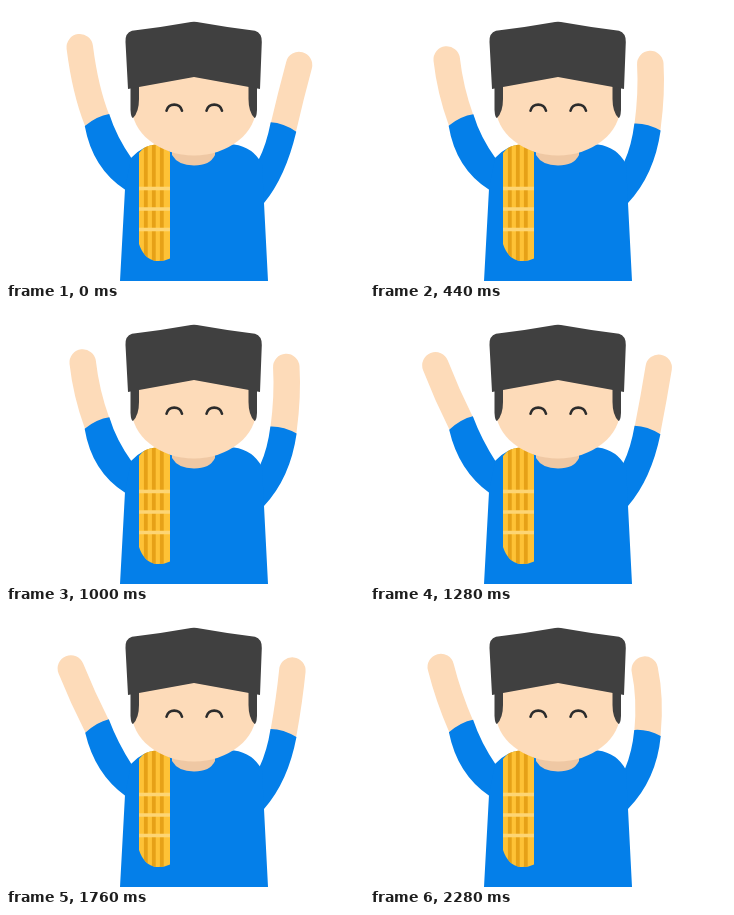
An HTML page that plays this animation: 358x275 px, repeating every 2320 ms.

```html
<!DOCTYPE html>
<html lang="en">
<head>
<meta charset="utf-8">
<title>Cheering man</title>
<style>
  html, body { margin: 0; width: 100%; height: 100%; overflow: hidden; background: #fff; }
  svg { display: block; width: 100%; height: 100%; }
  .skin { fill: #fddbb9; }
  .arm { fill: none; stroke: #fddbb9; stroke-width: 26.5; stroke-linecap: round; }
  .shirt { fill: #047fe9; }
  .dark { fill: #404040; }
  .eye { fill: none; stroke: #2c2c2c; stroke-width: 2.6; stroke-linecap: round; }
</style>
</head>
<body>
<svg viewBox="0 0 358 275">
  <defs>
    <clipPath id="scarf">
      <path d="M133 147Q138 139 150 138.500Q160 139 164 146V252.500Q158 255.500 150 255Q138 253 133 238Z"/>
    </clipPath>
    <path id="sideburn" class="dark" d="M124.500 78V104Q125 112 127 112Q133 106 133 93V78Z"/>
    <path id="eye" class="eye" d="M160.500 104.800C162 96.500 174.500 96.500 176 104.800"/>
  </defs>
  <path id="armL" class="arm"/>
  <path id="armR" class="arm"/>
  <path id="sleeveL" class="shirt"/>
  <path id="sleeveR" class="shirt"/>
  <path class="shirt" d="M114 275L119 183L125 152Q137 139 150 139L228 138.500Q247 141 256 158L258 197L262 275Z"/>
  <path fill="#efc8a4" d="M166 144V149Q172 159.500 188 159.500Q204 159.500 209 149V144Z"/>
  <g clip-path="url(#scarf)">
    <path fill="#fec236" d="M132 135H165V258H132Z"/>
    <path fill="none" stroke="#e6a117" stroke-width="3.800" d="M139.800 135V258M147.800 135V258M155.800 135V258"/>
    <path fill="none" stroke="#fdd574" stroke-width="3.600" d="M132 182.500H165M132 203H165M132 223.500H165"/>
  </g>
  <ellipse class="skin" cx="188" cy="99.500" rx="62.500" ry="50"/>
  <use href="#sideburn"/>
  <use href="#sideburn" transform="translate(375.500) scale(-1 1)"/>
  <path class="dark" d="M122 83L119.500 36Q119 27 126 24.800Q154 21.500 182 16.500Q188 15 194 16.500Q222 21.500 249 24.800Q256 27 255.800 36L254 83L188 71Z"/>
  <use href="#eye"/>
  <use href="#eye" x="40"/>
</svg>
<script>
const LOOP = 2320, STEP = 40;
const FIRST_IN = 320, BEAT = 280, SLOW_FROM = 1160, SLOW_TO = 1560;
const CUFF_HALF = 13.6, CUFF_ARCH = 4;

const byId = id => document.getElementById(id);
const mix = (a, b, k) => a + (b - a) * k;
const zigzag = x => Math.abs(1 - x % 2);

// Each moving point goes from its raised-out place to its bent-in place.
const point = (x0, y0, x1, y1) => s => [mix(x0, x1, s), mix(y0, y1, s)];

const arms = [
  {
    side: "L", start: 0.5, pace: 280, lift: 13, dir: -1, tilt: [35, 17],
    elbow: [91, 114], armpit: [119.5, 184],
    hand: point(53, 59.5, 94.5, 49), bend: point(73, 87, 85.5, 82),
    outer: point(92, 161, 81, 164), inner: point(113, 130, 108, 132),
    shoulder: point(126, 153, 126, 153)
  },
  {
    side: "R", start: 0.16, pace: 320, lift: 0, dir: 1, tilt: [22, 10],
    elbow: [277.5, 121], armpit: [258, 197],
    hand: point(298, 59.5, 267, 57), bend: point(286, 90, 279, 85),
    outer: point(277.5, 172, 289.5, 166.5), inner: point(260, 138, 263, 140),
    shoulder: point(252, 153, 256, 158)
  }
];

// 0 = arm raised outwards, 1 = arm bent in over the head.
function swing(t, { start, pace }) {
  if (t < FIRST_IN) return mix(start, 1, t / FIRST_IN);
  if (t < SLOW_FROM) return zigzag((t - FIRST_IN) / BEAT);
  if (t < SLOW_TO) return (t - SLOW_FROM) / (SLOW_TO - SLOW_FROM);
  return zigzag((t - SLOW_TO) / pace);
}

function drawArm(arm, t) {
  const s = swing(t, arm);
  const [ex, ey] = arm.elbow;
  const [hx, hy] = arm.hand(s);
  const lift = arm.lift * Math.max(0, 1 - t / FIRST_IN);
  byId("arm" + arm.side).setAttribute("d", `M${hx} ${hy - lift}Q${arm.bend(s)} ${ex} ${ey}`);

  const angle = mix(...arm.tilt, s) * Math.PI / 180;
  const dx = arm.dir * CUFF_HALF * Math.cos(angle), dy = CUFF_HALF * Math.sin(angle);
  const cuffOut = [ex + dx, ey + dy], cuffIn = [ex - dx, ey - dy];
  // The sleeve runs on under the body to the middle of the chest.
  byId("sleeve" + arm.side).setAttribute("d",
    `M${cuffIn}Q${ex},${ey - CUFF_ARCH} ${cuffOut}Q${arm.outer(s)} ${arm.armpit}` +
    `L188,190L${arm.shoulder(s)}Q${arm.inner(s)} ${cuffIn}Z`);
}

const start = performance.now();
function tick() {
  const t = (performance.now() - start) % LOOP;
  for (const arm of arms) drawArm(arm, Math.floor(t / STEP) * STEP);
  requestAnimationFrame(tick);
}
tick();
</script>
</body>
</html>
```
